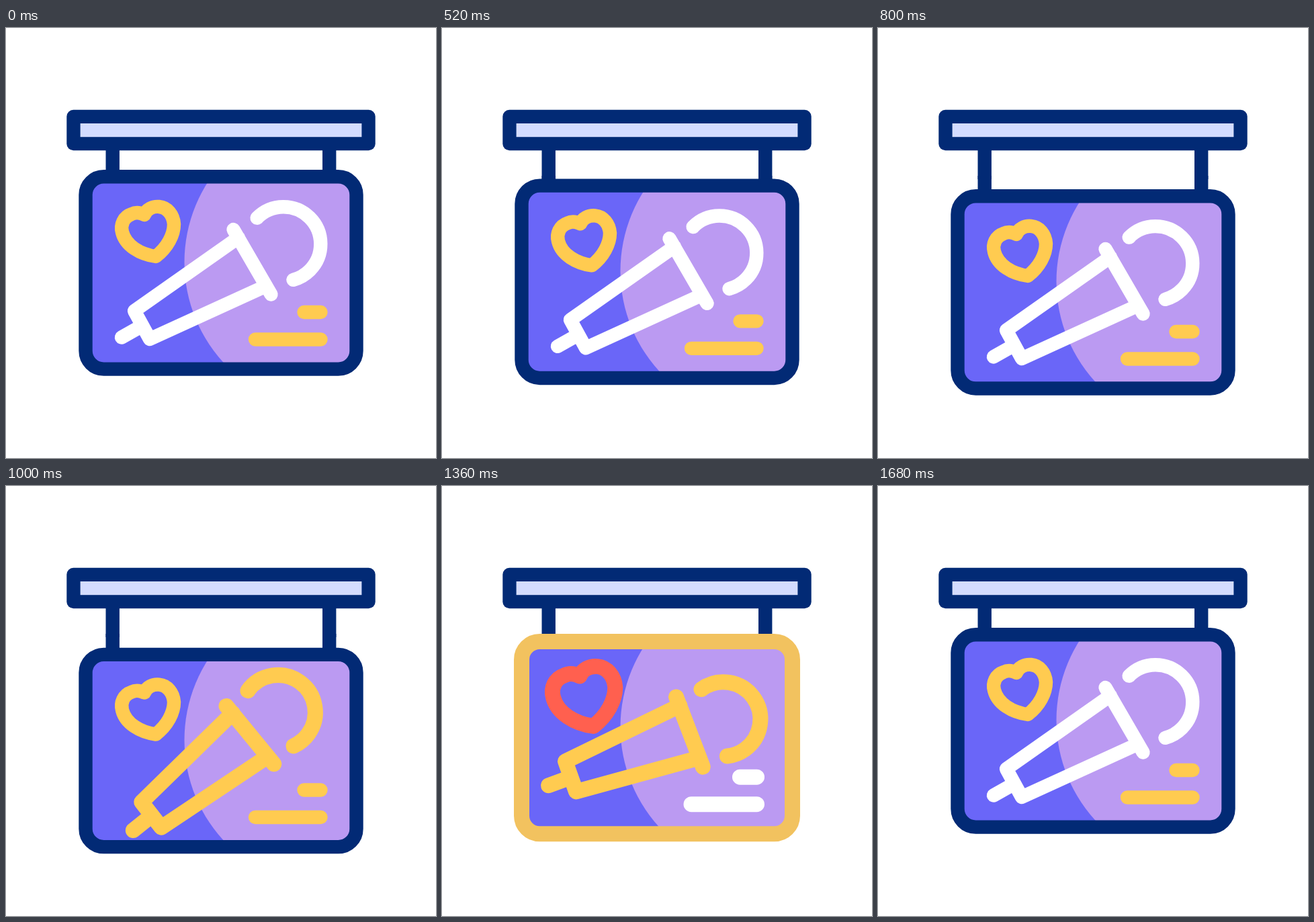
These frames come from a looping animation (640 px wide and 640 px high, 1.92 s). An HTML page with a canvas:

```html
<!DOCTYPE html>
<html lang="en">
<head>
<meta charset="utf-8">
<title>Karaoke sign</title>
<style>
  html, body { margin: 0; width: 100%; height: 100%; overflow: hidden; background: #fff; }
  canvas { display: block; width: 100vw; height: 100vh; }
</style>
</head>
<body>
<canvas id="stage" width="640" height="640"></canvas>
<script>
const ctx = document.getElementById('stage').getContext('2d');

const LOOP = 1920, STEP = 40;
const DROP = { start: 160, low: 920, end: 1680, depth: 30 };
const PIVOT = { x: 320, y: 364 };
const TILT = 9.2 * Math.PI / 180;
const THIN = 20.4, BOLD = 23;

const NAVY = '#022a75', PALE = '#d4dcff', INDIGO = '#6a66f8', LILAC = '#bb9af2';
const YELLOW = '#ffcb50', GOLD = '#f2c25f', RED = '#ff604f', WHITE = '#fff';

const heart = new Path2D('M206 278C200 275 193 274 187 277C175 281 170 293 173 304' +
  'C178 324 200 337 223 340C240 327 250 308 250 292C249 278 240 267 228 266' +
  'C218 265 209 270 206 278Z');

const mic = new Path2D('M338.5 300L394.5 396.5M346 312L191 421L214 463L387 384M172 460.5L203 443');
mic.moveTo(374, 282.7);
mic.arc(413, 321.5, 55.3, -2.363, 1.305);

const bars = new Path2D('M443.5 423H468.5M371 463.5H468.5');
const ropes = new Path2D('M158.7 172V225M481.2 172V225');

const board = new Path2D();
board.roundRect(118.5, 221.3, 403, 286.3, 27);

// Symmetric ease-in-out, cubic-bezier(a, 0, 1 - a, 1)
function ease(x, a = 0.53) {
  let lo = 0, hi = 1;
  for (let i = 0; i < 24; i++) {
    const s = (lo + hi) / 2, r = 1 - s;
    const px = 3 * a * s * r * r + 3 * (1 - a) * s * s * r + s * s * s;
    if (px < x) lo = s; else hi = s;
  }
  return lo * lo * (3 - 2 * lo);
}

function dropAt(t) {
  const { start, low, end, depth } = DROP;
  if (t <= start || t >= end) return 0;
  return depth * (t < low
    ? ease((t - start) / (low - start))
    : ease((end - t) / (end - low)));
}

function poseAt(t) {
  const lit = t >= 1080 && t < 1520;
  const singing = t >= 840 && t < 1520;
  return { lit, singing, tilt: lit ? TILT : singing ? -TILT : 0 };
}

function line(path, color, width) {
  ctx.strokeStyle = color;
  ctx.lineWidth = width;
  ctx.stroke(path);
}

function about(x, y, angle, scale, draw) {
  ctx.save();
  ctx.translate(x, y);
  ctx.rotate(angle);
  ctx.scale(scale, scale);
  ctx.translate(-x, -y);
  draw();
  ctx.restore();
}

function drawRail(drop) {
  ctx.lineCap = 'butt';
  line(ropes, NAVY, 20.4);
  ctx.fillStyle = NAVY;
  ctx.fillRect(148.5, 220, 20.4, drop + 5);
  ctx.fillRect(471, 220, 20.4, drop + 5);
  ctx.beginPath();
  ctx.roundRect(90.3, 121.8, 459.4, 60.4, 10);
  ctx.fill();
  ctx.fillStyle = PALE;
  ctx.fillRect(110.6, 142, 418.8, 20.2);
}

function drawBoard({ lit, singing, tilt }) {
  const width = lit ? BOLD : THIN;
  ctx.save();
  ctx.clip(board);
  ctx.fillStyle = INDIGO;
  ctx.fillRect(110, 210, 420, 310);
  ctx.fillStyle = LILAC;
  ctx.beginPath();
  ctx.arc(486.5, 348.5, 221, 0, 2 * Math.PI);
  ctx.fill();
  ctx.restore();

  line(board, lit ? GOLD : NAVY, width);
  ctx.lineCap = ctx.lineJoin = 'round';
  const grow = lit ? 1.2 : 1;
  about(211, 303.5, 0, grow, () => line(heart, lit ? RED : YELLOW, width / grow));
  line(bars, lit ? WHITE : YELLOW, width);
  about(PIVOT.x, PIVOT.y, tilt, 1,
    () => line(mic, singing ? YELLOW : WHITE, singing ? BOLD : THIN));
}

function render(now) {
  const t = Math.floor((now % LOOP) / STEP) * STEP;
  const drop = dropAt(t);
  ctx.fillStyle = WHITE;
  ctx.fillRect(0, 0, 640, 640);
  drawRail(drop);
  ctx.save();
  ctx.translate(0, drop);
  drawBoard(poseAt(t));
  ctx.restore();
}

let origin;
function tick(now) {
  origin ??= now;
  render(Math.max(0, now - origin));
  requestAnimationFrame(tick);
}
render(0);
requestAnimationFrame(tick);
</script>
</body>
</html>
```
